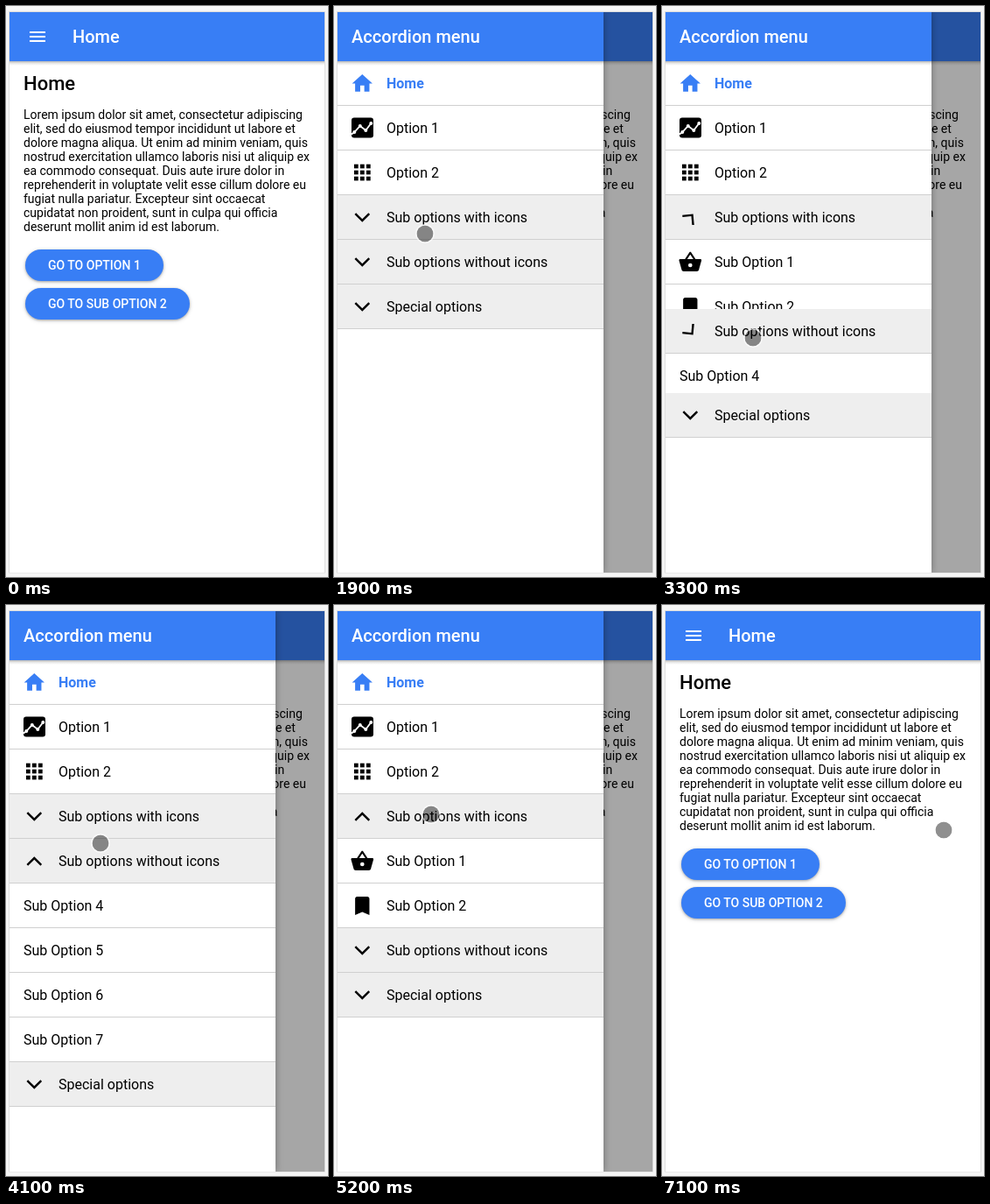
Animation, 368 px wide and 652 px high, one loop 7200 ms. Source, as an HTML page:

```html
<!DOCTYPE html>
<html lang="en">
<head>
<meta charset="utf-8">
<title>Accordion menu</title>
<style>
  html, body { margin: 0; width: 100%; height: 100%; overflow: hidden; background: #f5f5f5; }
  svg { display: block; }
  text { font-family: Roboto, sans-serif; font-size: 16px; white-space: pre; }
  .title { font-size: 20px; font-weight: 500; fill: #fff; }
  .heading { font-size: 22px; font-weight: 500; }
  .body { font-size: 14px; }
  .label { font-size: 14px; font-weight: 500; fill: #fff; }
  .button { filter: drop-shadow(0 1px 1px rgba(0,0,0,.22)) drop-shadow(0 1px 2px rgba(0,0,0,.2)); }
</style>
</head>
<body>
<svg id="stage" width="368" height="652" viewBox="0 0 368 652">
  <defs>
    <linearGradient id="under" x2="0" y2="1">
      <stop offset="0" stop-opacity=".28"/>
      <stop offset=".5" stop-opacity=".09"/>
      <stop offset="1" stop-opacity="0"/>
    </linearGradient>
    <filter id="blur" x="-20%" y="-20%" width="140%" height="140%"><feGaussianBlur stdDeviation="4"/></filter>
    <clipPath id="screen"><rect x="4" y="7" width="360" height="640"/></clipPath>
  </defs>
  <rect x="3.5" y="6.5" width="361" height="640.5" fill="#fff" stroke="#dedede"/>
  <g clip-path="url(#screen)">
    <g id="page"></g>
    <rect id="shade" x="4" y="7" width="360" height="640"/>
    <g id="menu"></g>
  </g>
  <g id="pointer">
    <circle r="9.5" fill-opacity=".44"/>
    <circle r="10.2" fill="none" stroke="#fff" stroke-opacity=".65" stroke-width="1.5"/>
  </g>
</svg>
<script>
const BLUE = '#387ef5', LOOP = 7200, TICK = 100, ROW = 51, MENU_W = 304;
const $ = id => document.getElementById(id);

// Markup helpers
const rect = (x, y, w, h, fill, extra = '') =>
  `<rect x="${x}" y="${y}" width="${w}" height="${h}" fill="${fill}" ${extra}/>`;
const text = (x, y, s, extra = '') => `<text x="${x}" y="${y}" ${extra}>${s}</text>`;
const glyph = (d, fill = '#000') =>
  `<path d="${d}" fill="${fill}" transform="scale(1.1667) translate(-12 -12)"/>`;
const bar = w => rect(4, 7, w, 56, BLUE) + rect(4, 63, w, 5, 'url(#under)');

const icons = {
  home: glyph('M10 20v-6h4v6h5v-8h3L12 3 2 12h3v8z', BLUE),
  chart: rect(-12.3, -12, 25, 23, '#000', 'rx="3"') +
    '<path d="M-12.3 7L-9 4.5-2.5-2.5 4 2.5 10-5.5" fill="none" stroke="#fff" stroke-width="1.8"/>' +
    [[-9, 4.5], [-2.5, -2.5], [4, 2.5], [10, -5.5]]
      .map(([x, y]) => `<circle cx="${x}" cy="${y}" r="2" fill="#fff"/>`).join(''),
  grid: [...Array(9).keys()]
    .map(i => rect(-9.3 + i % 3 * 7, -9.8 + (i / 3 | 0) * 7, 4.7, 4.7, '#000')).join(''),
  basket: glyph('M17.2 9l-4.4-6.6c-.4-.5-1.3-.5-1.6 0L6.8 9H2c-.6 0-1 .5-1 1.3l2.6 9.2c.2.9 1 1.5 1.9 1.5h13c.9 0 1.7-.6 1.9-1.5L23 10.3C23 9.5 22.600 9 22 9zM9 9l3-4.400L15 9zm3 8a2 2 0 1 1 0-4a2 2 0 1 1 0 4z'),
  bookmark: glyph('M17 3H7c-1.100 0-2 .9-2 2v16l7-3 7 3V5c0-1.100-.9-2-2-2z'),
  chevron: '<path class="chevron" d="M-8.800-3.600L-7.100-5.300 0 1.800 7.100-5.300 8.800-3.600 0 5.200z"/>'
};

function row(y, label, icon, extra = '', fill = '#fff') {
  return rect(4, y, MENU_W, ROW, fill) + rect(4, y + ROW - 1, MENU_W, 1, '#d0d0d0') +
    (icon ? `<g transform="translate(32.300 ${y + 25.5})">${icons[icon]}</g>` : '') +
    text(icon ? 60 : 20, y + 31, label, extra);
}
const head = (id, label) => `<g id="${id}">${row(0, label, 'chevron', '', '#eee')}</g>`;
const list = (id, rows) => `<svg id="${id}" width="368" overflow="hidden">${rows.join('')}</svg>`;
const button = (y, w, label) =>
  rect(22, y, w, 36, BLUE, 'rx="18" class="button"') + text(48, y + 23, label, 'class="label"');

const lorem = [
  'Lorem ipsum dolor sit amet, consectetur adipiscing',
  'elit, sed do eiusmod tempor incididunt ut labore et',
  'dolore magna aliqua. Ut enim ad minim veniam, quis',
  'nostrud exercitation ullamco laboris nisi ut aliquip ex',
  'ea commodo consequat. Duis aute irure dolor in',
  'reprehenderit in voluptate velit esse cillum dolore eu',
  'fugiat nulla pariatur. Excepteur sint occaecat',
  'cupidatat non proident, sunt in culpa qui officia',
  'deserunt mollit anim id est laborum.'
];

$('page').innerHTML = rect(4, 7, 360, 640, '#fff') + bar(360) +
  [29, 34, 39].map(y => rect(27, y, 18, 2, '#fff')).join('') +
  text(76, 42, 'Home', 'class="title"') +
  text(20, 96, 'Home', 'class="heading"') +
  lorem.map((s, i) => text(20, 129 + i * 16, s, 'class="body"')).join('') +
  button(278, 158, 'GO TO OPTION 1') + button(322, 188, 'GO TO SUB OPTION 2');

$('menu').innerHTML =
  rect(4, 7, MENU_W, 640, '#000', 'fill-opacity=".35" filter="url(#blur)"') +
  rect(4, 7, MENU_W, 640, '#fff') +
  row(63, 'Home', 'home', `font-weight="700" style="fill:${BLUE}"`) +
  row(114, 'Option 1', 'chart') + row(165, 'Option 2', 'grid') +
  head('head1', 'Sub options with icons') +
  list('list1', [row(0, 'Sub Option 1', 'basket'), row(ROW, 'Sub Option 2', 'bookmark')]) +
  head('head2', 'Sub options without icons') +
  list('list2', [4, 5, 6, 7].map((n, i) => row(i * ROW, 'Sub Option ' + n))) +
  head('head3', 'Special options') +
  bar(MENU_W) + text(20, 42, 'Accordion menu', 'class="title"');

// Timing helpers
function bezier(x1, y1, x2, y2) {
  const at = (a, b, s) => 3 * a * s * (1 - s) ** 2 + 3 * b * s * s * (1 - s) + s ** 3;
  return x => {
    if (x <= 0 || x >= 1) return x <= 0 ? 0 : 1;
    let lo = 0, hi = 1;
    for (let i = 0; i < 24; i++) {
      const mid = (lo + hi) / 2;
      if (at(x1, x2, mid) < x) lo = mid; else hi = mid;
    }
    return at(y1, y2, lo);
  };
}
const ease = bezier(.25, .1, .25, 1);
const slideIn = bezier(0, 0, .2, 1), slideOut = bezier(.4, 0, .6, 1);
const fold = (t, start) => ease((t - start) / 300);

// Pointer stops: time, x, y
const path = [
  [600, 305, 190], [1000, 60, 60], [1100, 36, 43], [1600, 36, 43], [1900, 104, 260],
  [2100, 104, 248], [2600, 104, 248], [2800, 104, 367], [2900, 104, 367], [3100, 104, 379],
  [3700, 104, 379], [4000, 107, 290], [4100, 108, 272], [4300, 111, 239],
  [5800, 111, 239], [6200, 322, 257], [LOOP, 322, 257]
];
function pointerAt(t) {
  const i = path.findIndex(p => p[0] > t);
  const [t0, x0, y0] = path[i - 1], [t1, x1, y1] = path[i];
  const k = (t - t0) / (t1 - t0);
  return [x0 + (x1 - x0) * k, y0 + (y1 - y0) * k];
}

const move = (id, x, y) => $(id).setAttribute('transform', `translate(${x} ${y})`);
function place(n, y, open, rows) {
  move('head' + n, 0, y);
  $('head' + n).querySelector('.chevron').setAttribute('transform', `rotate(${-180 * open})`);
  if (!rows) return;
  const h = Math.round(open * rows * ROW);
  $('list' + n).setAttribute('y', y + ROW);
  $('list' + n).setAttribute('height', h);
  return y + ROW + h;
}

function draw(t) {
  const shown = slideIn((t - 1370) / 280) - slideOut((t - 6366) / 280);
  move('menu', -(MENU_W + 16) * (1 - shown) + 16 * (1 - shown), 0);
  $('menu').style.display = shown > 0 ? '' : 'none';
  $('shade').setAttribute('fill-opacity', .35 * shown);

  const first = fold(t, 2150) - fold(t, 3250) + fold(t, 4450) - fold(t, 5450);
  const second = fold(t, 3250) - fold(t, 4450);
  const y2 = place(1, 216, first, 2);
  const y3 = place(2, y2, second, 4);
  place(3, y3, 0);

  const seen = t >= path[0][0];
  $('pointer').style.display = seen ? '' : 'none';
  if (seen) move('pointer', ...pointerAt(t));
}

// The picture advances in steps of one tick
const begin = performance.now();
function loop() {
  const t = (performance.now() - begin) % LOOP;
  draw(Math.floor(t / TICK) * TICK);
  requestAnimationFrame(loop);
}
loop();
</script>
</body>
</html>
```
